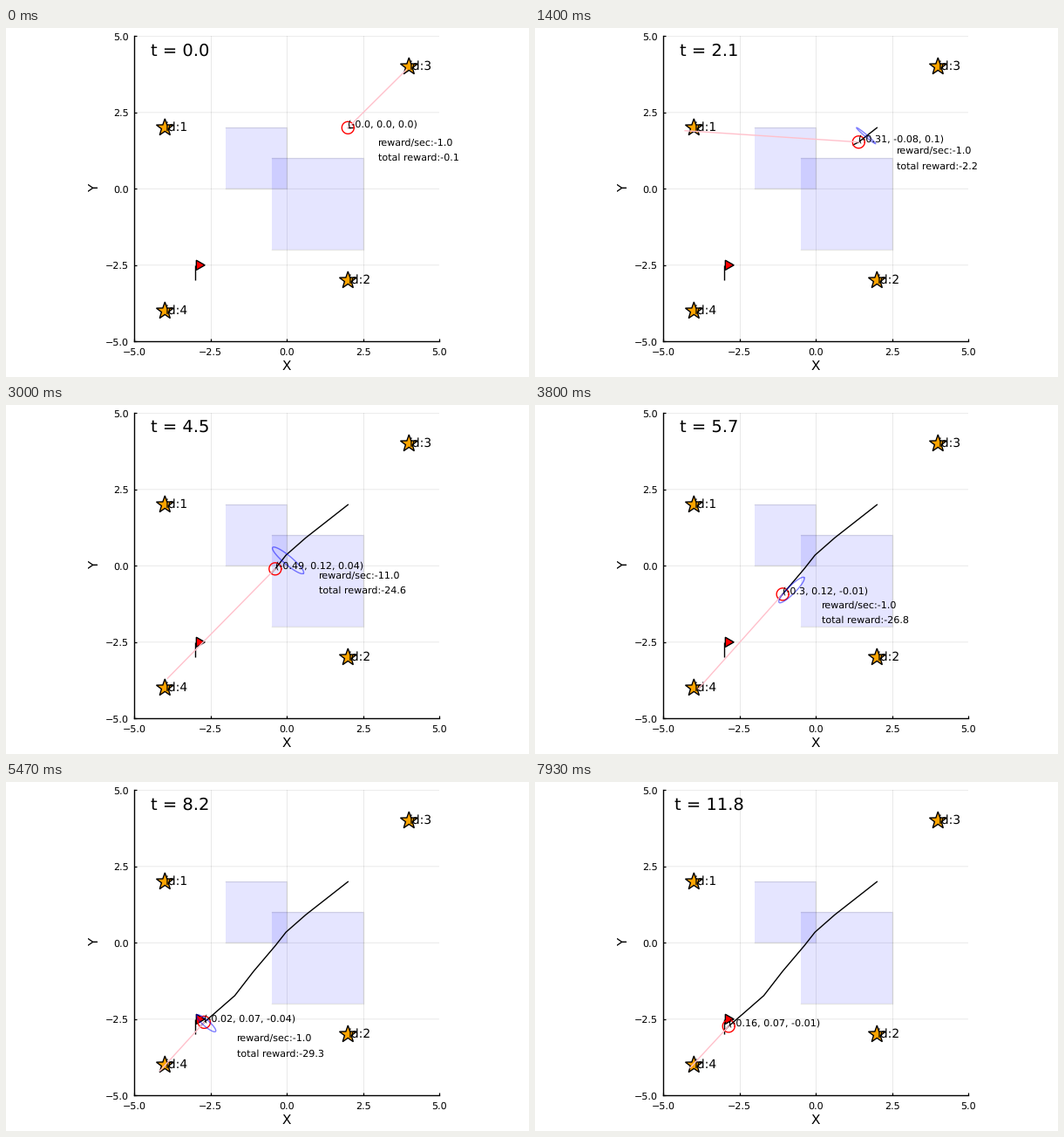
Recreate the animation shown at these times as a matplotlib script. Size 600 by 400 pixels, loop 8 s.

```python
import numpy as np
import matplotlib.pyplot as plt
from matplotlib.animation import FuncAnimation
from matplotlib.patches import Polygon, Rectangle

W, H, DPI = 600, 400, 100
FRAMES, LOOP_MS = 120, 8000
DT = 0.1
UNIT = 35  # pixels per world unit
START, GOAL = 13, 84  # frames where the drive begins and ends

plt.rcParams.update({"font.family": "DejaVu Sans", "font.size": 8,
                     "text.hinting": "none"})

LANDMARKS = [(-4, 2), (2, -3), (4, 4), (-4, -4)]
PUDDLES = [(-2, 0, 2, 2), (-0.5, -2, 3, 3)]  # x, y, width, height

# bends of the drive: frame, x, y
ROUTE = [(START, 2, 2), (21, 1.4, 1.53), (31, 0.62, 0.92), (40, -0.03, 0.35),
         (45, -0.385, -0.1), (57, -1.09, -0.93), (68, -1.71, -1.73),
         (77, -2.34, -2.28), (GOAL, -2.86, -2.73)]

# estimate error in the robot's own axes: frame, along, across, turn
DRIFT = [(START, -0.001, 0, 0), (21, -0.31, -0.08, 0.1),
         (31, -0.44, -0.05, 0.17), (45, -0.49, 0.12, 0.04),
         (57, -0.3, 0.12, -0.01), (82, -0.02, 0.07, -0.04),
         (GOAL, -0.16, 0.07, -0.01)]

step = np.arange(FRAMES)


def track(keys):
    at, *columns = np.array(keys).T
    return np.column_stack([np.interp(step, at, c) for c in columns])


def ramp(a, b):
    return np.clip((step - a) / (b - a), 0, 1)


def rotate(x, y, angle):
    c, s = np.cos(angle), np.sin(angle)
    return np.array([c * x - s * y, s * x + c * y])


def observe():
    """Noisy landmark sightings inside the camera's view, for every frame."""
    rng = np.random.default_rng(4)
    views = []
    for (x, y), head in zip(pos, theta):
        ends = []
        for mx, my in LANDMARKS:
            dist, ang = np.hypot(mx - x, my - y), np.arctan2(my - y, mx - x)
            off = (ang - head + np.pi) % (2 * np.pi) - np.pi
            if 0.5 < dist < 6 and abs(off) < np.pi / 3:
                dist *= np.clip(rng.normal(1, 0.07), 0.88, 1.17)
                ang += rng.normal(0, 0.025)
                ends.append((x + dist * np.cos(ang), y + dist * np.sin(ang)))
        views.append(ends)
    return views


pos = track(ROUTE)
err = track(DRIFT)

# turn on the spot at 2 rad/s, then straighten out halfway
theta = np.maximum(-2 * DT * step, np.radians(-153 + 20 * ramp(31, 45)))
est = pos + rotate(err[:, 0], err[:, 1], theta).T
views = observe()

# uncertainty grows until the next landmark comes into view, then shrinks
late = np.maximum(step - 45, 0)
long_axis = 0.66 * ramp(START, 45) ** 0.35 - 0.0068 * late
short_axis = 0.14 * ramp(START, 45) - 0.001 * late
tilt = np.radians(-40 + 85 * ramp(45, 57) + 94 * ramp(57, 82))

x, y = pos.T
wet = sum((px < x) & (x < px + w) & (py < y) & (y < py + h)
          for px, py, w, h in PUDDLES)
reward = -1.0 - 10 * wet
total = np.cumsum(reward) * DT

fig = plt.figure(figsize=(W / DPI, H / DPI), dpi=DPI, facecolor="white")
ax = fig.add_axes([147.3 / W, 40.7 / H, 10 * UNIT / W, 10 * UNIT / H])
ticks = np.linspace(-5, 5, 5)
ax.set(xlim=(-5, 5), ylim=(-5, 5), xticks=ticks, yticks=ticks)
ax.xaxis.set_major_formatter("{x:.1f}")
ax.yaxis.set_major_formatter("{x:.1f}")
ax.tick_params(direction="in", length=2.4, width=0.9, pad=4.4)
ax.tick_params(axis="x", pad=5)
ax.grid(color="black", alpha=0.1, lw=0.6)
ax.set_axisbelow(True)
for rule in ax.get_ygridlines():
    rule.set_snap(False)
ax.spines[["top", "right"]].set_visible(False)
ax.spines[["left", "bottom"]].set_linewidth(1)
fig.text(322 / W, 1 - 388 / H, "X", size=11, ha="center", va="center")
fig.text(102 / W, 1 - 183.5 / H, "Y", size=11, ha="center", va="center",
         rotation=90)

for px, py, w, h in PUDDLES:
    ax.add_patch(Rectangle((px, py), w, h, fc="blue", alpha=0.1, lw=0,
                           zorder=2))
    ax.plot([px, px + w, px + w, px], [py, py, py + h, py + h],
            color="black", alpha=0.1, lw=1, zorder=2)


def star(cx, cy, r=10.3 / UNIT):
    k = np.arange(10)
    a = np.pi / 2 + k * np.pi / 5
    rad = np.where(k % 2, 0.4 * r, r)
    pts = np.column_stack([cx + rad * np.cos(a), cy + rad * np.sin(a)])
    ax.add_patch(Polygon(pts, fc="orange", ec="black", lw=1, zorder=3))


for i, (mx, my) in enumerate(LANDMARKS, 1):
    star(mx, my)
    ax.text(mx, my, f"id:{i}", size=10, va="center", zorder=4)

ax.plot([-3, -3], [-3, -2.5], color="black", lw=1, zorder=3,
        solid_capstyle="butt")
ax.add_patch(Polygon([(-2.97, -2.34), (-2.69, -2.5), (-2.97, -2.66)],
                     fc="red", ec="black", lw=1, zorder=3))

ring = np.linspace(0, 2 * np.pi, 80)
circle = np.array([np.cos(ring), np.sin(ring)])


def line(color, z, **kw):
    return ax.plot([], [], color=color, lw=1, zorder=z, **kw)[0]


def note(z=10, **kw):
    return ax.text(0, 0, "", va="center", zorder=z, **kw)


nose = line("black", 5)
body = line("red", 6)
trail = line("black", 7)
beams = [line("pink", 8) for _ in LANDMARKS]
ellipse = line("blue", 9, alpha=0.5)
clock = note(size=14, ha="center")
clock.set_position((-3.5, 4.5))
label, rate, tally = note(), note(), note()


def draw(n):
    x, y = pos[n]
    clock.set_text(f"t = {n * DT:.1f}")
    body.set_data(x + 0.2 * circle[0], y + 0.2 * circle[1])
    dx, dy = rotate(0.2, 0, theta[n])
    nose.set_data([x, x + dx], [y, y + dy])
    trail.set_data(*pos[:n + 1].T)
    for i, beam in enumerate(beams):
        ends = views[n][i:i + 1]
        beam.set_data(*zip((x, y), *ends) if ends else ([], []))

    label.set_position((x, y + 0.1))
    label.set_text("({}, {}, {})".format(*(round(float(e), 2) for e in err[n])))

    for artist in (ellipse, rate, tally):
        artist.set_visible(n <= GOAL)
    ex, ey = est[n]
    sx, sy = rotate(long_axis[n] * circle[0], short_axis[n] * circle[1], tilt[n])
    ellipse.set_data(ex + sx, ey + sy)
    rate.set_position((ex + 1, ey - 0.5))
    rate.set_text(f"reward/sec:{reward[n]:.1f}")
    tally.set_position((ex + 1, ey - 1))
    tally.set_text(f"total reward:{total[n]:.1f}")
    return [clock, body, nose, trail, *beams, label, ellipse, rate, tally]


anim = FuncAnimation(fig, draw, frames=FRAMES, interval=LOOP_MS / FRAMES,
                     init_func=lambda: draw(0), repeat=True, repeat_delay=0)
plt.show()
```
